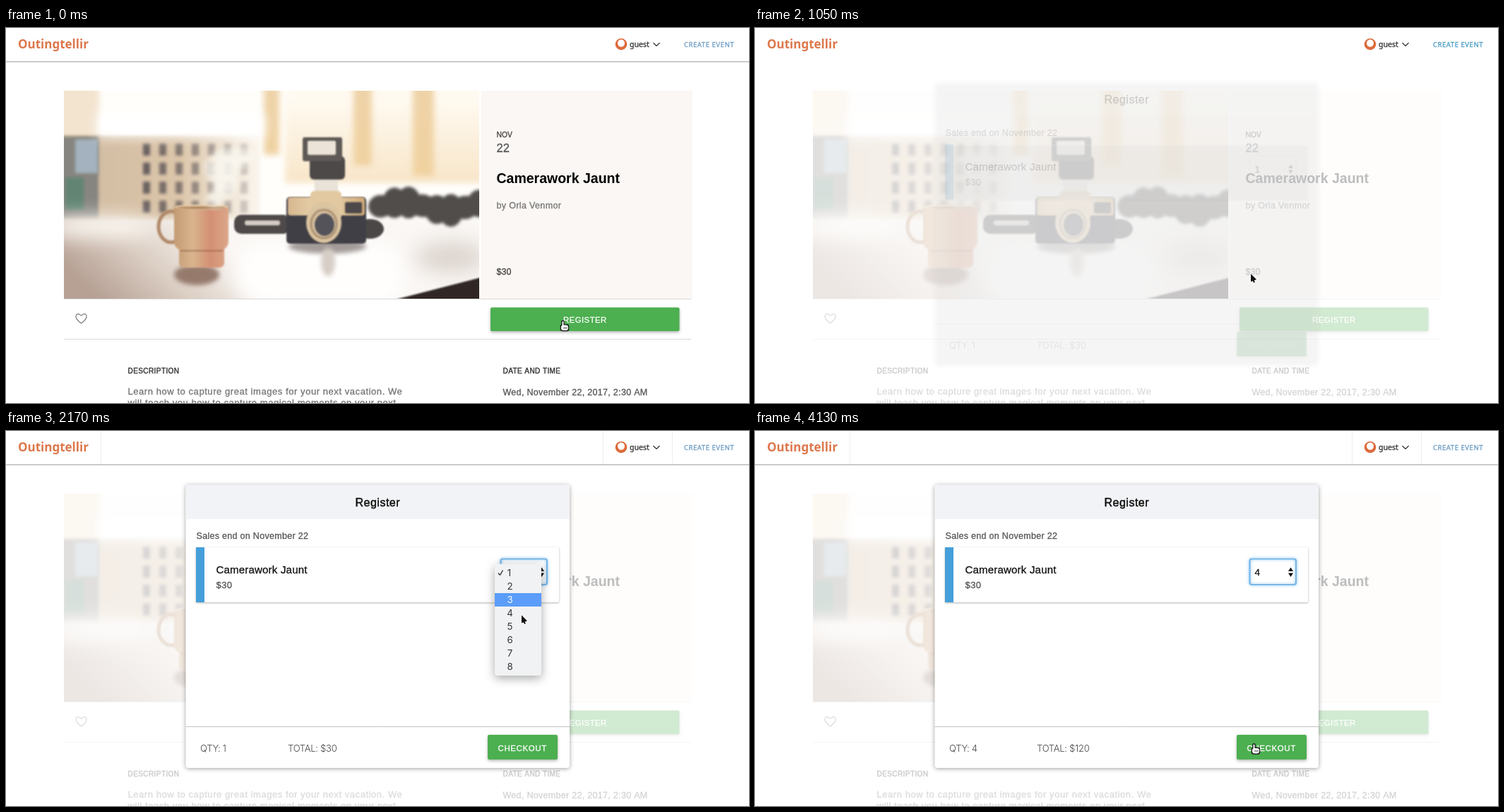
Recreate the animation shown at these times as an HTML page with a canvas. Size 1052 px wide and 532 px high, loop 4.2 s.

```html
<!DOCTYPE html>
<html lang="en">
<head>
<meta charset="utf-8">
<title>Event registration</title>
<style>
  html, body { margin: 0; width: 100%; height: 100%; overflow: hidden; background: #fff; }
  canvas { display: block; width: 1052px; height: 532px; }
</style>
</head>
<body>
<canvas id="stage" width="1052" height="532"></canvas>
<script>
const W = 1052, H = 532, LOOP = 4200, STEP = 70;
const BRAND = 'Outingtellir', EVENT = 'Camerawork Jaunt', HOST = 'Orla Venmor';
const SANS = '"Liberation Sans", Arial, sans-serif';
const NAV = '"Noto Sans", "Open Sans", sans-serif';
const UI = 'Inter, "Liberation Sans", sans-serif';
const GREEN = [76, 175, 80], DARK = [24, 78, 29];
const ctx = document.getElementById('stage').getContext('2d');

const clamp = (v, lo = 0, hi = 1) => Math.max(lo, Math.min(hi, v));
const ease = (t, a, b) => { const u = clamp((t - a) / (b - a)); return u * u * (3 - 2 * u); };
const mix = (a, b, u) => a + (b - a) * u;
const blend = (a, b, u) => `rgb(${a.map((v, i) => Math.round(mix(v, b[i], u)))})`;

// The hairline stroke gives the slightly heavy glyphs of a smoothed screen font.
function text(str, x, y, size, color, { gap = 0, weight = 400, font = SANS, align = 'left', heavy = 0.3 } = {}) {
  ctx.font = `${weight} ${size}px ${font}`;
  ctx.letterSpacing = gap + 'px';
  ctx.textAlign = align;
  ctx.fillStyle = ctx.strokeStyle = color;
  ctx.lineWidth = heavy;
  ctx.fillText(str, x, y);
  if (heavy) ctx.strokeText(str, x, y);
}

function box(c, x, y, w, h, color, r = 0) {
  c.fillStyle = color;
  c.beginPath();
  c.roundRect(x, y, w, h, r);
  c.fill();
}

function raised(x, y, w, h, color, r, blur, dy, alpha) {
  ctx.save();
  ctx.shadowColor = `rgba(0,0,0,${alpha})`;
  ctx.shadowBlur = blur;
  ctx.shadowOffsetY = dy;
  box(ctx, x, y, w, h, color, r);
  ctx.restore();
}

function triangle(c, color, x1, y1, x2, y2, x3, y3) {
  c.fillStyle = color;
  c.beginPath();
  c.moveTo(x1, y1);
  c.lineTo(x2, y2);
  c.lineTo(x3, y3);
  c.fill();
}

function oval(c, x, y, rx, ry, color) {
  c.fillStyle = color;
  c.beginPath();
  c.ellipse(x, y, rx, ry, 0, 0, 7);
  c.fill();
}

function ring(c, x, y, rx, ry, color, width) {
  c.strokeStyle = color;
  c.lineWidth = width;
  c.beginPath();
  c.ellipse(x, y, rx, ry, 0, 0, 7);
  c.stroke();
}

function line(x1, y1, x2, y2, color, width = 1) {
  ctx.strokeStyle = color;
  ctx.lineWidth = width;
  ctx.beginPath();
  ctx.moveTo(x1, y1);
  ctx.lineTo(x2, y2);
  ctx.stroke();
}

function ramp(c, x1, y1, x2, y2, ...colors) {
  const g = c.createLinearGradient(x1, y1, x2, y2);
  colors.forEach((col, i) => g.addColorStop(i / (colors.length - 1), col));
  return g;
}

function paintRoom(c) {
  c.filter = 'blur(4px)';
  box(c, 70, 70, 62, 85, '#f3e4cf');
  box(c, 395, 70, 290, 150, ramp(c, 0, 100, 0, 220, '#fffaf1', '#f8e6c9'));
  [376, 505, 591].forEach((x, i) =>
    box(c, x - 11 - 2 * i, 70, 22 + 4 * i, 110 + 15 * i, ramp(c, 0, 89, 0, 210, '#efd3a8', '#f0d2a0')));

  c.filter = 'blur(2px)';
  box(c, 70, 152, 290, 122, ramp(c, 130, 0, 360, 0, '#d3bda3', '#dcc6aa', '#fbf6ee'));
  box(c, 70, 154, 61, 118, '#87857f');
  box(c, 98, 158, 32, 48, '#a3b2be');
  box(c, 84, 212, 26, 46, '#628573');
  for (let i = 0; i < 28; i++) {
    const col = i % 7, row = Math.floor(i / 7);
    box(c, 194 + col * 23, 164 + row * 27, 10, 17, `rgba(88,80,84,${0.85 - col * 0.1})`);
  }
  c.filter = 'blur(9px)';
  box(c, 130, 122, 235, 32, '#fff');
}

function paintTable(c) {
  c.filter = 'blur(4px)';
  box(c, 70, 270, 612, 130, ramp(c, 150, 400, 270, 270, '#b7a195', '#dccfc4', '#faf7f4'));
  c.filter = 'blur(14px)';
  box(c, 325, 305, 240, 90, '#fffefd', 40);
  oval(c, 130, 282, 80, 14, '#fffdf8');
  oval(c, 630, 325, 50, 22, '#dcd4ce');
  c.filter = 'blur(3px)';
  oval(c, 270, 350, 32, 15, '#967b6d');
  oval(c, 455, 310, 55, 10, '#a29b98');
  oval(c, 456, 332, 10, 20, '#d6cdc6');
  c.filter = 'blur(1px)';
  triangle(c, '#2f2625', 552, 385, 676, 353, 676, 390);
}

function paintCamera(c) {
  c.filter = 'blur(2px)';
  for (let i = 0; i < 8; i++)
    oval(c, 530 + i * 20, 253 - 6 * Math.sin(i), 17, 20 - 4 * Math.cos(i * 2), '#514d4b');
  c.filter = 'blur(1px)';
  box(c, 323, 265, 80, 27, '#4f4a49', 10);
  box(c, 338, 273, 50, 7, '#d3cbc4', 3);
  oval(c, 515, 285, 20, 14, '#4b4747');

  // flash on its foot
  box(c, 437, 205, 33, 30, '#e9e2d8');
  box(c, 430, 182, 50, 33, '#4d4949', 6);
  box(c, 420, 155, 56, 34, '#5f5a57', 3);
  box(c, 427, 160, 40, 20, '#ebe3d8', 2);

  box(c, 397, 240, 113, 66, '#403f45', 5);
  box(c, 399, 240, 109, 26, ramp(c, 399, 0, 508, 0, '#d6b88f', '#eed9b5', '#cda878'), 4);
  box(c, 431, 231, 44, 40, '#e2c9a2', 6);
  box(c, 480, 247, 24, 16, '#4d494a', 2);
  oval(c, 450, 276, 25, 29, '#dbc4a0');
  ring(c, 450, 278, 18, 20, '#a88f72', 3);
  oval(c, 451, 279, 14, 16, '#55535a');
}

function paintCup(c) {
  c.filter = 'blur(.8px)';
  const clay = ramp(c, 238, 0, 315, 0, '#c39b74', '#d9b58e', '#d48f73', '#dba88a');
  ring(c, 234, 282, 18, 22, '#b18a69', 5);
  box(c, 245, 300, 64, 40, clay, 7);
  box(c, 238, 253, 77, 62, clay, [2, 2, 12, 12]);
  box(c, 247, 315, 60, 2, 'rgba(120,75,55,.45)');
  oval(c, 276.5, 254, 38.5, 3.5, '#e6cda8');
  oval(c, 276.5, 255, 35, 2, '#b08662');
}

function paintPhoto() {
  const cv = document.createElement('canvas');
  cv.width = 588; cv.height = 295;
  const c = cv.getContext('2d');
  c.translate(-82, -89);
  box(c, 82, 89, 588, 295, '#fffefb');
  [paintRoom, paintTable, paintCamera, paintCup].forEach(paint => paint(c));
  return cv;
}
const photo = paintPhoto();

function steam(t) {
  const puff = 1 - ease(t, 0, 280) * 0.45;
  ctx.save();
  ctx.beginPath();
  ctx.rect(82, 89, 588, 295);
  ctx.clip();
  ctx.filter = 'blur(4px)';
  for (let i = 0; i < 6; i++) {
    const sway = 8 * Math.sin(t / 190 + i * 1.3);
    oval(ctx, 296 + i * 5 + sway, 242 - i * 12, 12 + i * 4 * puff, 12, `rgba(250,249,243,${0.65 * puff})`);
  }
  ctx.restore();
}

function heart(x, y) {
  ctx.strokeStyle = '#777';
  ctx.lineWidth = 1.2;
  ctx.beginPath();
  for (const side of [-1, 1]) {
    ctx.moveTo(x, y + 12.5);
    ctx.bezierCurveTo(x + 14 * side, y + 2, x + 5 * side, y - 5, x, y + 2);
  }
  ctx.stroke();
}

function drawPage(t) {
  ctx.drawImage(photo, 82, 89);
  steam(t);

  box(ctx, 673, 89, 299, 295, '#fbf7f4');
  text('NOV', 694.5, 155, 10.3, '#444');
  text('22', 694.5, 175.5, 16.5, '#555');
  text(EVENT, 694.5, 220, 19.5, '#000', { weight: 700, heavy: 0 });
  text('by ' + HOST, 694.5, 256, 12.5, '#757575', { gap: 0.35 });
  text('$30', 694.5, 350, 12.5, '#444');
  [384.5, 441.5].forEach(y => line(82, y, 970, y, '#d9d9d9'));
  heart(106.5, 406.5);

  const pressed = ease(t, 90, 240) * (1 - ease(t, 420, 640));
  raised(686, 396.5, 267.5, 33.5, blend(GREEN, DARK, pressed), 2, 4, 2, 0.3);
  text('REGISTER', 789, 418, 11.3, '#fff', { gap: 0.5 });

  const body = { gap: 0.56 }, head = { gap: 0.42, heavy: 0.4 };
  text('DESCRIPTION', 172.5, 490, 10, '#333', head);
  text('Learn how to capture great images for your next vacation. We', 172.5, 520, 13, '#757575', body);
  text('will teach you how to capture magical moments on your next', 172.5, 536, 13, '#757575', body);
  text('DATE AND TIME', 703.5, 490, 10, '#333', head);
  text('Wed, November 22, 2017, 2:30 AM', 703.5, 520.5, 12.5, '#555', { gap: 0.3 });
}

function drawHeader(t) {
  const late = t >= 1470;
  box(ctx, 0, 0, W, 47, '#fff');
  ctx.globalAlpha = late ? 1 : 1 - ease(t, 420, 700);
  line(0, 47.5, W, 47.5, '#bdbdbd');
  line(0, 48.5, W, 48.5, '#dadada');
  ctx.globalAlpha = 1;
  if (late) [134.5, 845.5, 943.5].forEach(x => line(x, 0, x, 47, '#eee'));

  text(BRAND, 17, 29, 17, '#dd774b', { weight: 600, font: NAV, heavy: 0 });
  oval(ctx, 871, 23, 8.3, 8.3, '#dd6b3c');
  oval(ctx, 871, 21.5, 5, 5.2, '#fff');
  text('guest', 883, 26.5, 10.6, '#333', { weight: 500, font: NAV });
  for (const side of [-1, 1]) line(921, 25.5, 921 + 4.5 * side, 21, '#333', 1.2);
  const link = late || t < 490 ? '#6c9cc4' : '#4b9cc4';
  text('CREATE EVENT', 960, 26.5, 9.6, link, { weight: 500, font: NAV, gap: 0.5 });
}

function drawSelect(qty, focus) {
  ctx.save();
  if (focus) { ctx.shadowColor = '#8cc4ee'; ctx.shadowBlur = 4; }
  ctx.strokeStyle = focus ? '#76b7e8' : '#ccc';
  ctx.lineWidth = focus ? 2.2 : 1;
  ctx.beginPath();
  ctx.roundRect(700.5, 181.5, 65.5, 36.5, 3);
  ctx.stroke();
  ctx.restore();
  text(qty, 707.5, 204.5, 13.5, '#111');
  for (const side of [-1, 1]) {
    const y = 200.2 + 1.2 * side;
    triangle(ctx, '#111', 755, y, 762, y, 758.5, y + 5.5 * side);
  }
}

function drawModal(t, open, qty) {
  ctx.globalAlpha = ease(t, 980, 1300);
  raised(254.5, 76.5, 543.5, 401.5, '#fff', 4, 6, 1, 0.38);
  box(ctx, 254.5, 76.5, 543.5, 48.5, '#f2f3f6', [4, 4, 0, 0]);
  text('Register', 494.5, 107, 16, '#111', { gap: 0.5, heavy: 0.5 });
  text('Sales end on November 22', 269.5, 152.5, 12.5, '#555', { gap: 0.3 });

  raised(269, 165, 514, 78, '#fff', 1, 3, 1, 0.3);
  box(ctx, 269, 165, 12, 78, '#459fda');
  text(EVENT, 297.5, 201.5, 15, '#111', { gap: 0.2 });
  text('$30', 297.5, 223, 13, '#555', { gap: 0.4 });
  drawSelect(qty, t >= 1750);

  line(254.5, 419.5, 798, 419.5, '#c4c4c4');
  const thin = { weight: 300, font: UI, gap: -0.25, heavy: 0 };
  text('QTY: ' + qty, 275, 455, 13, '#444', thin);
  text('TOTAL: $' + qty * 30, 399, 455, 13, '#444', thin);
  raised(682, 431, 99, 35, '#4caf50', 2, 4, 2, 0.3);
  text('CHECKOUT', 696.5, 453.5, 11.5, '#fff', { gap: 0.6 });

  if (open) drawMenu(t);
  ctx.globalAlpha = 1;
}

function drawMenu(t) {
  const top = 192.3, rowH = 18.9;
  const hover = clamp(Math.floor((cursorAt(t - STEP).y - top) / rowH), 0, 7);
  raised(692, 188.5, 66, 158.5, '#f1f2f3', 4, 14, 4, 0.34);
  box(ctx, 692, top + hover * rowH, 66, rowH, '#5b9df9');
  for (let i = 0; i < 8; i++)
    text(i + 1, i ? 713.5 : 712.5, 206.2 + i * rowH, 13.3, i === hover ? '#fff' : '#333', { font: UI, align: 'center', heavy: 0 });
  const tick = hover ? '#333' : '#fff';
  line(697, 201.5, 699.5, 204.5, tick, 1.4);
  line(699.5, 204.5, 703.5, 197.5, tick, 1.4);
}

// Each stop is an arrival time and place; every move takes MOVE ms.
const MOVE = 390;
const STOPS = [
  [1260, 593, 265], [1720, 735, 200], [2240, 729.5, 267], [2900, 716.5, 264], [3920, 706.5, 443.5]
];

function cursorAt(t) {
  return STOPS.reduce((p, [end, x, y]) => {
    const u = ease(t, end - MOVE, end);
    return { x: mix(p.x, x, u), y: mix(p.y, y, u) };
  }, { x: 788.5, y: 415 });
}

function drawHand() {
  for (const grow of [0.7, -0.5]) {
    const color = grow > 0 ? '#111' : '#fff', size = 2 * grow;
    box(ctx, -1.5 - grow, 0.5 - grow, 3 + size, 11 + size, color, 1.5);
    box(ctx, -3 - grow, 6 - grow, 11 + size, 8.5 + size, color, 3);
  }
  for (let x = 1.5; x < 6; x += 2) line(x, 9, x, 12, '#333', 0.8);
}

function drawArrow() {
  line(2, 6, 5.2, 12.8, '#fff', 3.6);
  triangle(ctx, '#fff', -0.9, -1.8, -0.9, 13, 9.6, 9);
  triangle(ctx, '#111', 0, 0, 0, 11.3, 8, 8.2);
  line(2, 6, 5, 12.4, '#111', 2);
}

function drawCursor(t) {
  const { x, y } = cursorAt(t);
  if (t >= 2940 && t < 3150) ring(ctx, 717, 264.5, 16.5, 16.5, '#111', 2.4);
  ctx.save();
  ctx.translate(x, y);
  if (t < 200 || y > 431) drawHand();
  else drawArrow();
  ctx.restore();
}

function draw(t) {
  const chosen = t >= 3220;
  box(ctx, 0, 0, W, H, '#fff');
  drawPage(t);
  box(ctx, 0, 0, W, H, `rgba(255,255,255,${0.74 * ease(t, 420, 700)})`);
  drawHeader(t);
  if (t > 980) drawModal(t, t >= 1820 && !chosen, chosen ? 4 : 1);
  drawCursor(t);
}

function frame() {
  const t = performance.now() % LOOP;
  draw(Math.floor(t / STEP) * STEP);
  requestAnimationFrame(frame);
}
frame();
</script>
</body>
</html>
```
